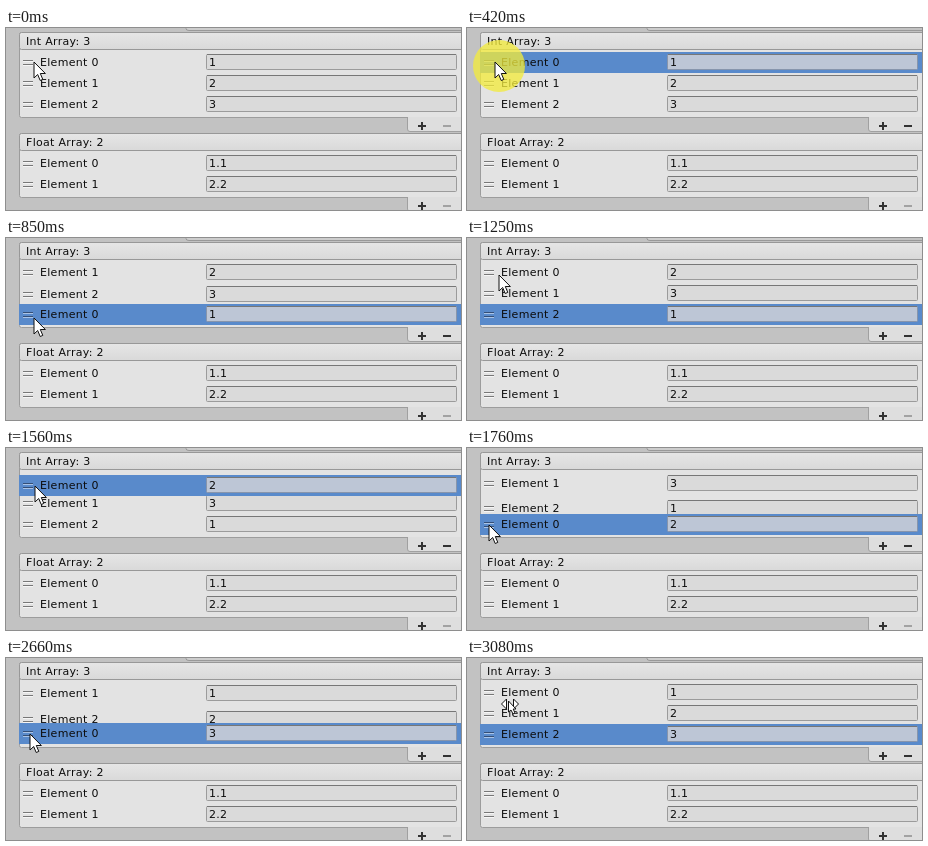
Write an HTML page that moves like this. It is 455 px wide and 182 px high and loops after 3430 ms.

```html
<!DOCTYPE html>
<html lang="en">
<head>
<meta charset="utf-8">
<title>Reorderable lists</title>
<style>
html, body { margin: 0; width: 100%; height: 100%; overflow: hidden; background: #c2c2c2; }
svg { display: block; width: 455px; height: 182px; }
text { font: 11px "DejaVu Sans", Verdana, sans-serif; letter-spacing: .3px; fill: #0c0c0c; white-space: pre; }
.band { fill: none; }
.box { fill: #dadada; stroke: #9b9b9b; }
.active .band { fill: #598acb; }
.active .box { fill: #bdc6d6; stroke: #8795ac; }
.grip { stroke: #777; }
.shine { stroke: #f6f6f6; }
.active .grip { stroke: #344f77; }
.active .shine { stroke: #a9c3e6; }
.sign { stroke: #333; stroke-width: 2; fill: none; }
.off { stroke: #a2a2a2; }
</style>
</head>
<body>
<svg viewBox="0 0 455 182">
  <defs>
    <linearGradient id="head" x2="0" y2="1">
      <stop stop-color="#e6e6e6"/><stop offset="1" stop-color="#d9d9d9"/>
    </linearGradient>
  </defs>
  <path d="M180 -4V.5Q180 2.5 183 2.5H456" fill="#cdcdcd" stroke="#999"/>
  <g id="lists"></g>
  <g id="rows"></g>
  <circle id="click" r="26" fill="#f3ec3c" fill-opacity=".76"/>
  <path id="arrow" d="M0 0V16L3.7 12.5 6.2 18.5 8.8 17.4 6.3 11.5H11.4Z" fill="#fff" stroke="#111"/>
  <g id="slide" fill="#fff" stroke="#111">
    <path d="M-3.5 -5V5L-8.5 0ZM3.5 -5V5L8.5 0Z"/>
    <path d="M-1.5 -3V8L1 6 3 10 5 9 3.2 5H6Z"/>
  </g>
</svg>
<script>
const LOOP = 3430, ROW = 21, TOP = 34, SETTLE = 45;
const $ = id => document.getElementById(id);

// Cursor stops: time, x, y
const stops = [
  [0, 28, 34], [530, 28, 34], [780, 28, 80], [940, 28, 80],
  [1210, 32, 37], [1250, 32, 37], [1340, 30, 34], [1510, 30, 34],
  [1800, 22, 79], [1960, 22, 79], [2270, 24, 35], [2415, 24, 35],
  [2700, 24, 78], [2830, 24, 78], [3070, 43, 46], [LOOP, 43, 46]
];
const drags = [
  { press: 420, up: 530, start: 530, end: 780, from: 34, to: 80, drop: 900 },
  { press: 1380, up: 1500, start: 1510, end: 1800, from: 34, to: 79, drop: 1900 },
  { press: 2320, up: 2440, start: 2415, end: 2700, from: 35, to: 78, drop: 2800 }
];

const ease = u => u * u * (3 - 2 * u);
const unease = v => .5 - Math.sin(Math.asin(1 - 2 * v) / 3);

function cursorAt(t) {
  const i = stops.findIndex((s, n) => n && t < s[0]);
  const [t0, x0, y0] = stops[i - 1], [t1, x1, y1] = stops[i];
  const k = ease((t - t0) / (t1 - t0));
  return [x0 + (x1 - x0) * k, y0 + (y1 - y0) * k];
}

// Moment the dragged row enters slot n
function crossing(d, n) {
  const y = TOP + ROW * (n - .5) + .5;
  return d.start + (d.end - d.start) * unease((y - d.from) / (d.to - d.from));
}

const rowMarkup = (name, value) => `
  <rect class="band" x="13" y="-10" width="442" height="21"/>
  <path class="shine" d="M17 -.5H27M17 3.5H27"/>
  <path class="grip" d="M17 -1.5H27M17 2.5H27"/>
  <text class="name" x="34" y="4">${name}</text>
  <rect class="box" x="200.5" y="-7.5" width="250" height="15" rx="1"/>
  <path d="M201 -7.5H450" stroke="#777"/>
  <text class="value" x="203" y="4">${value}</text>`;

const listMarkup = (title, y, bottom, id) => `
  <path d="M401.5 ${bottom}V${bottom + 12}Q401.5 ${bottom + 14.5} 404 ${bottom + 14.5}H456V${bottom}" fill="#dedede" stroke="#a0a0a0"/>
  <rect x="13.5" y="${y + .5}" width="446" height="${bottom - y}" rx="2" fill="#e3e3e3" stroke="#9c9c9c"/>
  <path d="M402 ${bottom + .5}H455" stroke="#dedede"/>
  <rect x="13.5" y="${y + .5}" width="446" height="17" rx="2" fill="url(#head)" stroke="#989898"/>
  <text x="20" y="${y + 13}">${title}</text>
  <path class="sign" d="M412 ${bottom + 9}h8m-4 -4v8"/>
  <path class="sign off" id="${id}" d="M437 ${bottom + 9}h8"/>`;

$("lists").innerHTML =
  listMarkup("Int Array: 3", 4, 89, "minus") +
  listMarkup("Float Array: 2", 105, 169, "minus2") +
  ["1.1", "2.2"].map((v, i) =>
    `<g transform="translate(0 ${135 + ROW * i})">${rowMarkup("Element " + i, v)}</g>`).join("");

// The last group is painted on top
$("rows").innerHTML = [1, 2, 0].map(i => `<g>${rowMarkup("Element " + i, "")}</g>`).join("");
const [r1, r2, r0] = $("rows").children;
const rows = [r0, r1, r2].map(g => ({
  g, value: g.querySelector(".value")
}));

function draw(t) {
  const [x, y] = cursorAt(t);
  const drag = drags.find(d => t >= d.press && t < d.drop);
  const moves = drags.filter(d => t >= d.drop).length;
  const active = drag ? 0 : moves ? 2 : -1;

  rows.forEach(({ g, value }, i) => {
    let pos = TOP + ROW * i;
    if (drag && i === 0) {
      pos = Math.min(TOP + 2 * ROW, Math.max(TOP, y - 1));
    } else if (drag) {
      const since = t - crossing(drag, i);
      if (since > 0) pos -= ROW * (1 - Math.exp(-since / SETTLE));
    }
    g.setAttribute("transform", `translate(0 ${Math.round(pos)})`);
    g.classList.toggle("active", i === active);
    value.textContent = (i + moves) % 3 + 1;
  });
  $("minus").classList.toggle("off", active < 0);

  const at = `translate(${Math.round(x)} ${Math.round(y)})`;
  const sliding = x > 33;
  $("arrow").setAttribute("transform", at);
  $("slide").setAttribute("transform", at);
  $("arrow").style.display = sliding ? "none" : "";
  $("slide").style.display = sliding ? "" : "none";
  $("click").setAttribute("transform", `translate(${Math.round(x) + 4} ${Math.round(y) + 4})`);
  $("click").style.display = drag && t < drag.up ? "" : "none";
}

const began = performance.now();
function tick() {
  draw((performance.now() - began) % LOOP);
  requestAnimationFrame(tick);
}
tick();
</script>
</body>
</html>
```
